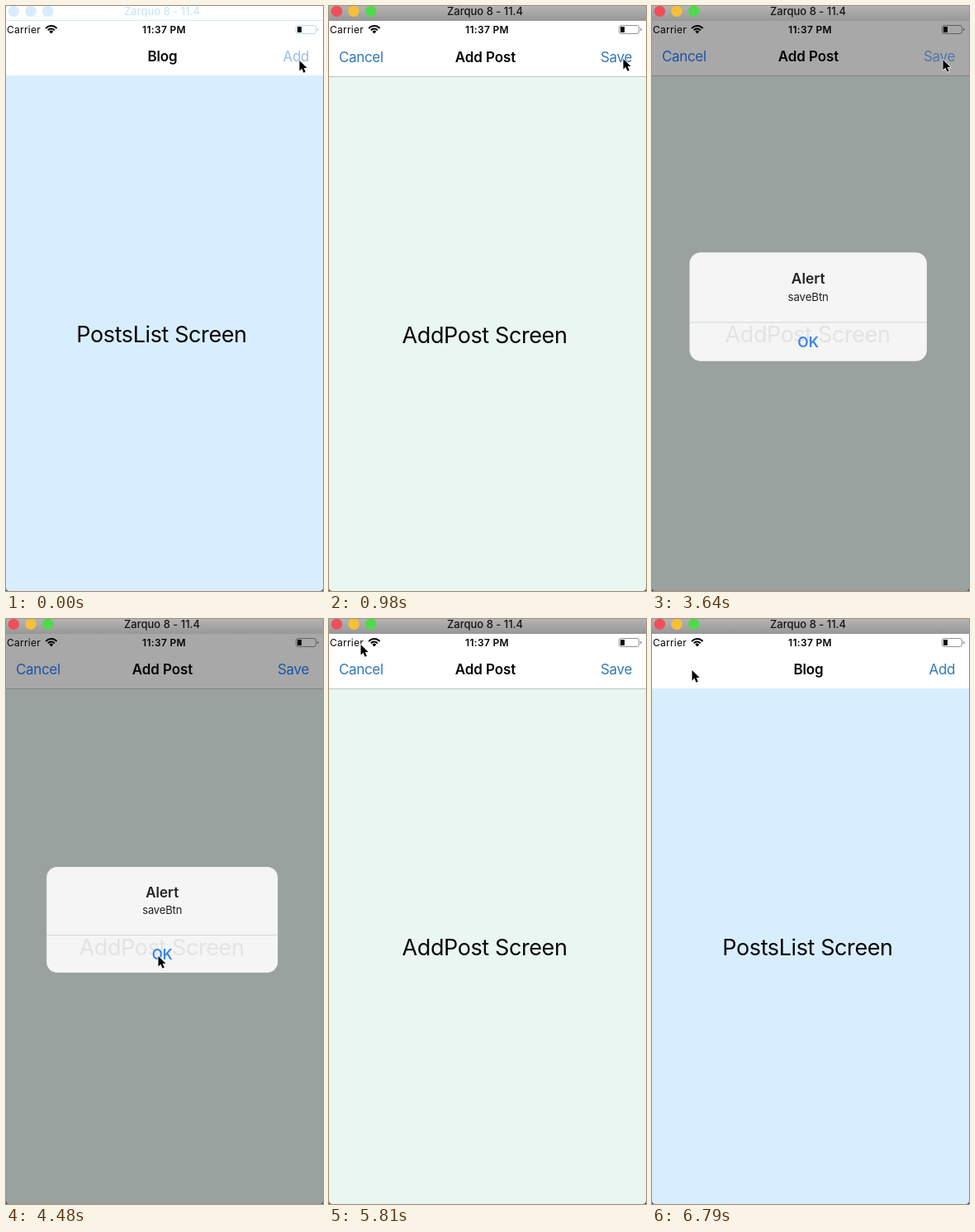
These frames come from a looping animation (384 by 708 pixels, 6.86 s). An HTML page with a canvas:

```html
<!DOCTYPE html>
<html lang="en">
<head>
<meta charset="utf-8">
<title>Blog navigation</title>
<style>
  html, body { margin: 0; width: 100%; height: 100%; overflow: hidden; background: #fff; }
  canvas { display: block; }
</style>
</head>
<body>
<canvas width="384" height="708"></canvas>
<script>
const ctx = document.querySelector('canvas').getContext('2d');
const W = 384, H = 708, TOP = 18, NAV = 84, LOOP = 6860;
const OPEN = 70, ALERT = 3220, DISMISS = 5070, CLOSE = 6050;

// Pointer keys: time, x, y of the tip
const pointerKeys = [
  [0, 355, 65], [70, 355, 65], [490, 356, 63], [3000, 356, 63], [3300, 352, 64],
  [3700, 352, 64], [4480, 184, 407], [5250, 184, 407], [5780, 38, 30],
  [5820, 38, 30], [6000, 48, 61], [LOOP, 48, 61]
];

const lerp = (a, b, k) => a + (b - a) * k;
const smooth = k => k * k * (3 - 2 * k);
// Critically damped spring from 0 to 1
const spring = x => x <= 0 ? 0 : 1 - (1 + x) * Math.exp(-x);

function rect(x, y, w, h, color) {
  ctx.fillStyle = color;
  ctx.fillRect(x, y, w, h);
}

function text(str, x, y, size, { color = '#050505', weight = 400, align = 'center', gap = 0 } = {}) {
  ctx.font = `${weight} ${size}px Inter, sans-serif`;
  ctx.letterSpacing = gap + 'px';
  ctx.textAlign = align;
  ctx.fillStyle = color;
  ctx.fillText(str, x, y);
}

const navTitle = str => text(str, 189.5, 67, 17, { weight: 600, gap: -0.1 });
const link = (str, x, align, color) => text(str, x, 67, 17, { align, color, gap: -0.35 });
const heading = str => text(str, 188.5, 407, 27, { gap: -0.4 });

function titleBar(washed) {
  const shade = ctx.createLinearGradient(0, 0, 0, TOP);
  shade.addColorStop(0, '#b4b4b5');
  shade.addColorStop(1, '#979798');
  rect(0, 0, W, TOP, washed ? '#fff' : shade);
  if (washed) rect(0, TOP - 1, W, 1, '#d8ecff');
  ['#ee4f5a', '#f6c038', '#50d94c'].forEach((color, i) => {
    ctx.fillStyle = washed ? '#d8ecff' : color;
    ctx.beginPath();
    ctx.arc(9.3 + i * 20.7, 6.3, 6.7, 0, 7);
    ctx.fill();
  });
  text('Zarquo 8 - 11.4', 189, 11, 13, { weight: 500, color: washed ? '#cde5fb' : '#151515' });
}

function statusBar(washed) {
  text('Carrier', 1, 33, 12, { align: 'left', gap: 0.25 });
  text('11:37 PM', 191.5, 33, 12, { weight: 600, gap: 0.3 });

  ctx.strokeStyle = '#050505';
  ctx.lineWidth = 2;
  for (const r of [5.4, 8.9]) {
    ctx.beginPath();
    ctx.arc(54.8, 33, r, -Math.PI * 0.77, -Math.PI * 0.23);
    ctx.stroke();
  }
  ctx.fillStyle = '#050505';
  ctx.beginPath();
  ctx.moveTo(54.8, 33.4);
  ctx.arc(54.8, 33, 3.2, -Math.PI * 0.77, -Math.PI * 0.23);
  ctx.fill();

  const edge = washed ? '#b9d9f5' : '#8f9295';
  ctx.strokeStyle = edge;
  ctx.lineWidth = 1;
  ctx.beginPath();
  ctx.roundRect(351.5, 23.5, 24, 10, 2.5);
  ctx.stroke();
  rect(377, 27, 1.5, 3, edge);
  rect(353, 25, 5, 7, '#050505');
}

function listScreen(washed) {
  rect(0, 0, W, NAV, '#fff');
  rect(0, NAV, W, H - NAV, '#d8eeff');
  navTitle('Blog');
  link('Add', 367, 'right', washed ? '#94c0e8' : '#3379b7');
  heading('PostsList Screen');
}

function postScreen(offset, dim, pressed) {
  ctx.save();
  ctx.translate(0, offset);
  rect(0, TOP, W, NAV - TOP, '#fff');
  rect(0, NAV, W, H - NAV, '#eaf6f1');
  rect(0, NAV, W, 1, '#bcc4c0');
  navTitle('Add Post');
  const blue = `rgb(${lerp(51, 40, dim)}, ${lerp(121, 125, dim)}, ${lerp(183, 255, dim)})`;
  link('Cancel', 12, 'left', blue);
  if (pressed) ctx.globalAlpha = 0.6;
  link('Save', 367, 'right', blue);
  ctx.globalAlpha = 1;
  heading('AddPost Screen');
  ctx.restore();
}

function alertBox(scale, opacity) {
  ctx.save();
  ctx.globalAlpha = opacity;
  ctx.translate(189.2, 364);
  ctx.scale(scale, scale);
  ctx.fillStyle = 'rgba(255, 255, 255, 0.89)';
  ctx.beginPath();
  ctx.roundRect(-140, -64, 280, 128, 13);
  ctx.fill();
  rect(-140, 18, 280, 1, '#d3d7d5');
  text('Alert', 0, -27, 17, { weight: 600, color: '#222' });
  text('saveBtn', 0, -7, 13, { gap: -0.15, color: '#222' });
  text('OK', 0, 48, 17, { weight: 600, color: '#3b86e4' });
  ctx.restore();
}

function pointer(t) {
  const i = pointerKeys.findIndex(key => key[0] > t);
  const [t0, x0, y0] = pointerKeys[i - 1], [t1, x1, y1] = pointerKeys[i];
  const k = smooth((t - t0) / (t1 - t0));
  ctx.save();
  ctx.translate(lerp(x0, x1, k) + 0.5, lerp(y0, y1, k) + 1);
  ctx.scale(0.88, 0.88);
  const arrow = new Path2D('M0 0V14.2L3.3 11.2L5.7 16.8L8.3 15.7L5.9 10.2H10.4Z');
  ctx.lineJoin = 'round';
  ctx.lineWidth = 1.6;
  ctx.strokeStyle = '#fff';
  ctx.stroke(arrow);
  ctx.fillStyle = '#000';
  ctx.fill(arrow);
  ctx.restore();
}

// Dark desktop behind the rounded bottom of the window
function corners() {
  ctx.fillStyle = '#3a3d40';
  ctx.beginPath();
  ctx.rect(0, 0, W, H);
  ctx.roundRect(0, 0, W, H, [0, 0, 4, 4]);
  ctx.fill('evenodd');
}

function draw(t) {
  const washed = t < OPEN;
  const shown = spring((t - OPEN) * 0.01) - spring((t - CLOSE) * 0.013);
  const offset = Math.round((1 - shown) * (H - TOP));
  const dim = spring((t - ALERT) * 0.02) * (1 - spring((t - DISMISS) * 0.01));

  listScreen(washed);
  postScreen(offset, dim, t > 3000 && t < 3750);
  statusBar(washed);
  rect(0, TOP, W, H - TOP, `rgba(0, 0, 0, ${0.34 * dim})`);
  if (dim > 0.002) alertBox(1.2 - 0.2 * spring((t - ALERT) * 0.0084), dim);
  titleBar(washed);
  corners();
  pointer(t);
}

const start = performance.now();
function tick() {
  draw((performance.now() - start) % LOOP);
  requestAnimationFrame(tick);
}
tick();
</script>
</body>
</html>
```
